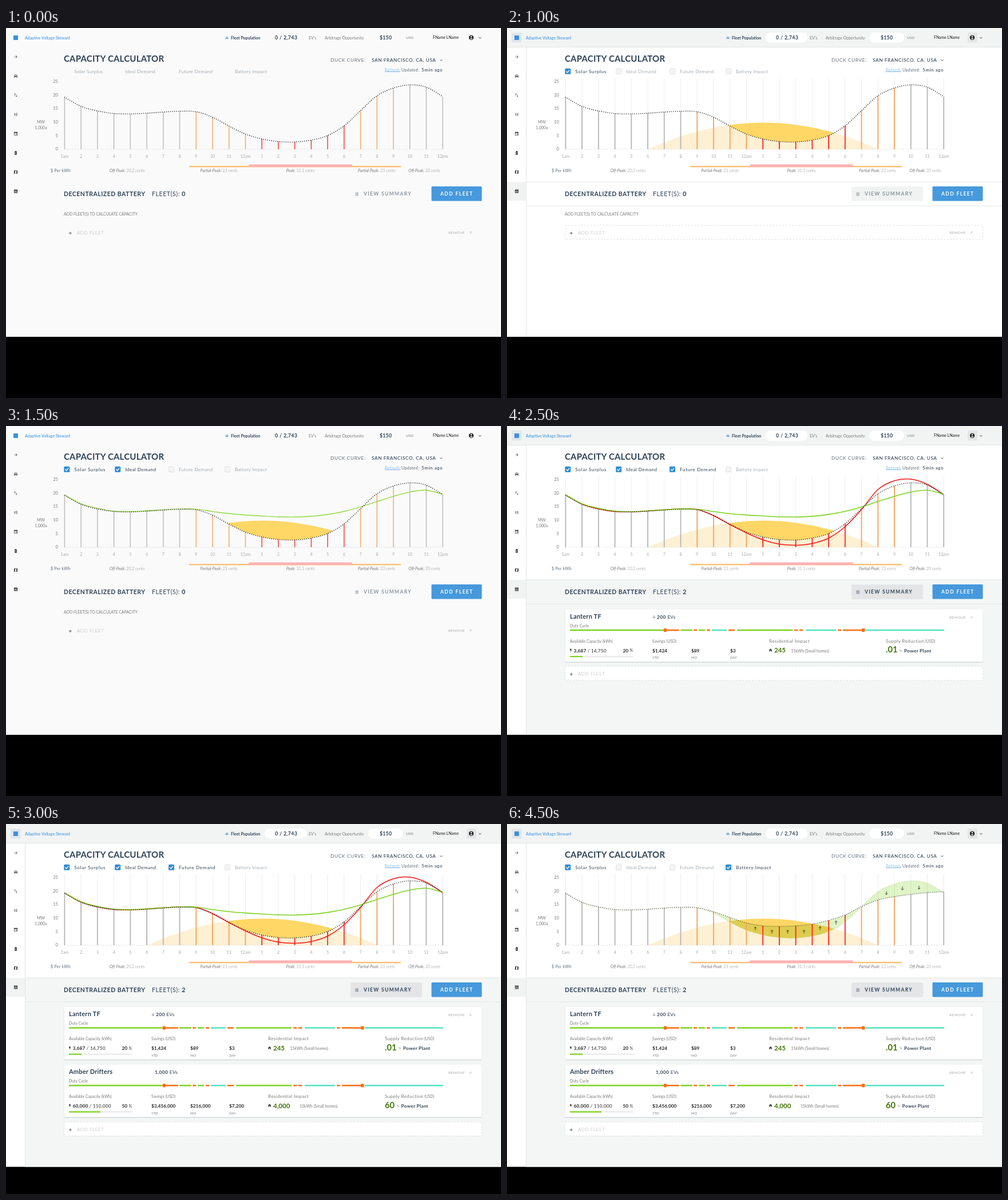
Animation of 865 by 647 pixels, one loop 5 s. Source, as an HTML page:

```html
<!DOCTYPE html>
<html lang="en">
<head>
<meta charset="utf-8">
<title>Capacity calculator</title>
<style>
html, body { margin: 0; width: 100%; height: 100%; overflow: hidden; background: #000; }
svg { display: block; width: 100vw; height: 100vh; }
text { font-family: Lato, sans-serif; fill: #2f4358; white-space: pre; }
.b { font-weight: 700; }
.m { font-weight: 500; }
.l { font-weight: 300; }
.i { font-style: italic; }
.mid { text-anchor: middle; }
.end { text-anchor: end; }
.dark { fill: #2a2a2a; }
.slate { fill: #5d6b79; }
.grey { fill: #7b7b7b; }
.pale { fill: #a9a9a9; }
.blue { fill: #2f8fe3; }
.white { fill: #fff; }
.orange { fill: #ff6d0c; }
.lime { fill: #7ed321; }
.green { fill: #417505; }
.dots { fill: none; stroke-linecap: round; }
.tint { mix-blend-mode: multiply; }
</style>
</head>
<body>
<svg id="stage" viewBox="0 0 865 647" preserveAspectRatio="none"></svg>
<script>
const LOOP = 5000, SLOT = 500;
const ORANGE = '#ff6d0c', LIME = '#7ed321', TEAL = '#50e3c2';

const text = (x, y, size, str, cls = '', gap = 0) =>
  `<text x="${x}" y="${y + size * .36}" font-size="${size}" class="${cls}" letter-spacing="${gap}">${str}</text>`;
const rect = (x, y, w, h, fill, extra = '') =>
  `<rect x="${x}" y="${y}" width="${w}" height="${h}" fill="${fill}" ${extra}/>`;
const line = (x1, y1, x2, y2, color, w = 1, extra = '') =>
  `<path d="M${x1} ${y1}L${x2} ${y2}" stroke="${color}" stroke-width="${w}" ${extra}/>`;
const dot = (x, y, r, fill) => `<circle cx="${x}" cy="${y}" r="${r}" fill="${fill}"/>`;
const stroke = (d, color, w, extra = '') =>
  `<path d="${d}" fill="none" stroke="${color}" stroke-width="${w}" ${extra}/>`;
const icon = (x, y, size, d, fill = '#444') =>
  `<path transform="translate(${x - size / 2} ${y - size / 2}) scale(${size / 24})" d="${d}" fill="${fill}" fill-rule="evenodd"/>`;
const chevron = (x, y, s = 1, color = '#444') => stroke(`M${x - 2} ${y - s}l2 ${2 * s}l2 ${-2 * s}`, color, 1);
const cross = (x, y) => stroke(`M${x - 1.7} ${y - 1.7}l3.4 3.4m0 -3.4l-3.4 3.4`, '#aaa', .7);
const plus = y => stroke(`M109.8 ${y}h5m-2.5 -2.5v5`, '#555', .9);
const at = (dy, body) => `<g transform="translate(0 ${dy})">${body}</g>`;
// Shown only during the listed half-second slots.
const show = (slots, body) => `<g data-on="${slots}">${body}</g>`;

const PLAIN = '034', FULL = '1256789', FLEETS = '156789';

const CAR = 'M19 6L17.5 4.5h-11L5 6L2.5 12v9h3.5v-3h12v3h3.5v-9zM5 11l1.5-4.5h11L19 11zM5 13.5h3v2.5h-3zM16 13.5h3v2.5h-3z';
const SIDE_ICONS = [
  'M2 11h15l-6-6l1.5-1.5L21 12l-8.5 8.5L11 19l6-6H2z',
  CAR,
  'M8 2L3.5 7H7v8h2V7h3.5zM16 22l4.5-5H17V9h-2v8h-3.5z',
  'M2 5h11v2H2zM16 3h2v2h4v2h-4v2h-2zM2 11h4V9h2v6H6v-2H2zM11 11h11v2H11zM2 17h9v2H2zM14 15h2v2h6v2h-6v2h-2z',
  'M2 3h4V1h3v2h6V1h3v2h4v19H2zM4.5 9v10.5h15V9zM12 12h5v5h-5z',
  'M9 1h6v3h3v19H6V4h3zM11 8v5H9l3 6v-5h2z',
  'M2 4l6-2l8 2l6-2v18l-6 2l-8-2l-6 2zM8.5 5v13l7 1.5v-13z',
  'M2 2h20v20H2zM6 10h2.5v8H6zM11 6h2.5v12H11zM16 13h2.5v5H16z'
];

function shell() {
  const page = h => rect(0, 0, 865, h, '#fff');
  const body = h => rect(34, 269, 831, h - 269, '#f4f6f6');
  const edge = h => line(33.5, 34, 33.5, h, '#e1e4e5');
  return show(PLAIN, rect(0, 0, 865, 540, '#fafafa')) +
    show('25', page(540)) + show('6789', page(599.5)) +
    show('1', page(466.5) + body(647)) + show('5', body(540)) + show('6789', body(599.5)) +
    show(FULL,
      rect(0, 0, 865, 33.5, '#f2f4f4') + line(0, 33.5, 865, 33.5, '#e3e6e7') +
      rect(0, 269, 33, 33, '#f1f3f3') +
      line(34, 269, 865, 269, '#e1e5e6') + line(34, 311, 865, 311, '#e1e5e6') +
      rect(8, 8, 17.5, 17.5, '#e2e6e9', 'rx="1.5"') + rect(805, 8, 17, 17.5, '#e3e5e6', 'rx="1.5"') +
      rect(452, 8, 73, 17.5, '#fff', 'rx="8.7"') + rect(633, 8, 61, 17.5, '#fff', 'rx="8.7"')) +
    show('1', edge(466.5)) + show('25', edge(540)) + show('6789', edge(599.5));
}

function header() {
  return rect(13, 13, 8, 8, '#3d91dc') +
    text(33, 17, 7, 'Adaptive Voltage Steward', 'blue') +
    icon(386, 17, 6, CAR, '#3d91dc') +
    text(393, 17, 7, 'Fleet Population', 'b') +
    text(470, 17, 8.8, '0 / 2,743', 'b', .35) +
    text(529, 17, 7, "EV's", 'grey') +
    text(557, 17, 7, 'Arbitrage Opportunity', 'grey') +
    text(653, 17, 8.8, '$150', 'b', .2) +
    text(699, 17, 6.5, 'USD', 'grey') +
    text(746, 17, 6.9, 'FName LName', 'm dark') +
    dot(813, 16.8, 4.1, '#222') + dot(813, 15.3, 1.3, '#f3f3f3') +
    `<path d="M810.5 18.8q2.5 -2 5 0q-2.5 2.3 -5 0" fill="#f3f3f3"/>` +
    chevron(828.3, 17.2, 1.1) +
    SIDE_ICONS.map((d, i) => icon(17, 50.3 + i * 33.6, 7.4, d)).join('');
}

function titles() {
  return text(101, 53.7, 15, 'CAPACITY CALCULATOR', 'b', .2) +
    text(567, 56, 8.2, 'DUCK CURVE:', 'slate', .7) +
    text(639, 56, 8.2, 'SAN FRANCISCO, CA, USA', 'm', .63) + chevron(760.5, 56.3) +
    text(662, 73, 7.2, 'Refresh', 'l blue', .4) + line(662, 76.5, 689, 76.5, '#2f8fe3', .6) +
    text(691, 73, 7.2, 'Updated:', 'slate', .25) +
    text(726, 72.7, 8, '5min ago', 'm', .6);
}

function option(x, label, onSlots, gapOff, gapOn) {
  const offSlots = [...'0123456789'].filter(s => !onSlots.includes(s)).join('');
  const boxSlots = offSlots.replace('0', '');
  return show(boxSlots, rect(x + .5, 71.2, 9.2, 9.2, '#f4f4f4', 'rx="1.5" stroke="#dcdcdc" stroke-width=".8"')) +
    show(offSlots, text(x + 18, 76.3, 8.2, label, 'l slate', gapOff)) +
    show(onSlots, rect(x, 70.8, 10, 10, '#2f8bd6', 'rx="1.5"') +
      stroke(`M${x + 2.2} 75.8l2.1 2.2l3.7 -4.3`, '#fff', 1.3) +
      text(x + 18, 76.3, 8.2, label, '', gapOn));
}

// Heights of each curve at the 24 hours of the day.
const DUCK = [121, 137, 145, 149.5, 150.2, 149, 147, 145.6, 146.5, 156, 171.5, 185.5,
  194, 198.5, 199.3, 196, 188, 171, 144.5, 118.5, 105, 99.5, 103.5, 120];
const IDEAL = [120.5, 136, 144, 148.8, 149.7, 148.2, 146.5, 145, 145.5, 149.5, 153.2, 155.6,
  157.3, 158.8, 159.2, 157.9, 154.6, 149.3, 141.5, 132, 123, 115.5, 112.3, 119.5];
const FUTURE = [120.5, 136.5, 145, 149.5, 150, 148.5, 146.5, 145, 145.8, 157, 172.5, 187,
  199, 206.5, 208.5, 205.5, 196, 176, 146, 111, 95.7, 93, 102, 120];
const STORED = DUCK.slice(0, 9).concat([153.5, 163.5, 173, 178, 179, 178, 175, 168.5, 159,
  144.5, 133, 127, 123, 120, 118.5]);

const hourX = i => 102.4 + i * 28.73;
const points = ys => ys.map((y, i) => [hourX(i), y]);
const smooth = pts => pts.slice(1).map((c, i) => {
  const b = pts[i], a = pts[i - 1] || b, d = pts[i + 2] || c;
  const out = k => (b[k] + (c[k] - a[k]) / 6).toFixed(2), into = k => (c[k] - (d[k] - b[k]) / 6).toFixed(2);
  return `C${out(0)} ${out(1)} ${into(0)} ${into(1)} ${c}`;
}).join('');
const curve = ys => `M${points(ys)[0]}${smooth(points(ys))}`;

function bars(ys, w) {
  const color = i => i < 8 || i > 20 ? '#b8b8b8' : i > 11 && i < 18 ? '#ff2a26' : '#f4a65c';
  return ys.map((y, i) => line(hourX(i), y, hourX(i), 212, color(i), w)).join('');
}

const arrow = (x, y, dir) =>
  stroke(`M${x} ${y + 3 * dir}V${y - 3 * dir}m-2.2 ${2.2 * dir}l2.2 ${-2.2 * dir}l2.2 ${2.2 * dir}`, '#333', .9);

function chart() {
  const sun = 'M247 212Q448 119 649 212Z';
  const stored = points(STORED).reverse();
  const band = `${curve(DUCK)}L${stored[0]}${smooth(stored)}Z`;
  const suffix = { 0: 'am', 11: 'am', 23: 'pm' };
  const hours = DUCK.map((_, i) => (i % 12 + 1) + (suffix[i] || ''));
  const up = [[434, 183], [463, 188.5], [490.5, 188.5], [519, 188.5], [547, 182.5], [575, 172.5]];
  const down = [[663, 120.5], [691, 112.5], [720, 111]];
  const dotted = (ys, color, w, step) => stroke(curve(ys), color, w, `class="dots" stroke-dasharray="0 ${step}"`);
  return `<defs><clipPath id="above"><path d="${curve(DUCK)}V80H102Z"/></clipPath></defs>` +
    show(FULL, DUCK.map((_, i) => line(hourX(i), 88, hourX(i), 212, '#ececec')).join('') +
      `<path d="${sun}" fill="#fef0d3"/>`) +
    show('123456789', `<path d="${sun}" fill="#fed766" clip-path="url(#above)"/>`) +
    show('19', `<path d="${band}" fill="#dff4c7" class="tint"/>`) +
    line(102, 212, 763, 212, '#d4d4d4', .9, 'stroke-dasharray="2 2.5"') +
    show(PLAIN, bars(DUCK, 1.4)) + show('25678', bars(DUCK, 1.9)) + show('19', bars(STORED, 1.9)) +
    show('4567', stroke(curve(FUTURE), '#fb1414', 1.5)) +
    show('34', stroke(curve(IDEAL), LIME, 1.2)) + show('56', stroke(curve(IDEAL), LIME, 1.6)) +
    show('02345678', dotted(DUCK, '#222', 1.6, 3.6)) +
    show('19', dotted(DUCK, '#a3c957', 1.1, 3) + dotted(STORED, '#333', 1.4, 3.5) +
      up.map(p => arrow(...p, 1)).join('') + down.map(p => arrow(...p, -1)).join('')) +
    [25, 20, 15, 10, 5, 0].map((n, i) => text(91, 93.5 + i * 23.6, 7.6, n, 'end grey')).join('') +
    text(61, 164.5, 7.2, 'MW', 'mid grey') + text(61, 174, 7, '1,000x', 'mid grey') +
    hours.map((h, i) => text(hourX(i), 224.3, 7.3, h, 'mid pale')).join('');
}

function prices() {
  const price = (x, name, cost) => text(x, 249.7, 7,
    `<tspan class="i grey">${name}:</tspan><tspan class="l grey"> ${cost} cents</tspan>`, 'mid');
  const round = 'stroke-linecap="round"';
  return line(321, 242.2, 689, 242.2, '#fdc277', 2.4, round) +
    line(426, 240.8, 603, 240.8, '#ffb1b4', 4.5, round) +
    text(78, 249.7, 7, '$ Per kWh', 'slate', .3) +
    price(211.5, 'Off-Peak', '20.2') + price(372, 'Partial-Peak', '23') + price(514.5, 'Peak', '31.1') +
    price(647.5, 'Partial-Peak', '23') + price(731, 'Off-Peak', '20');
}

function toolbar() {
  const summary = (cls, mark) => [288, 289.6, 291.2, 292.8].map(y => line(610.3, y, 616, y, mark, 1.1)).join('') +
    text(625, 290.3, 8.5, 'VIEW SUMMARY', cls, 1.35);
  const button = fill => rect(602, 277.3, 125, 25.4, fill, 'rx="1.5"');
  return text(101, 290.2, 10.5, 'DECENTRALIZED BATTERY', 'b', .5) +
    text(255, 290.2, 10.5, 'FLEET(S):', '', .6) +
    show('01234', text(307, 290.2, 11, '0', 'b')) + show('56789', text(307, 290.2, 11, '2', 'b')) +
    show(FLEETS, button('#e3e5e6') + summary('b', '#8a949e')) + show('2', button('#f1f3f3')) +
    show('0234', `<g opacity=".55">${summary('b', '#6b7580')}</g>`) +
    rect(743.5, 277, 88, 25.6, '#4699dc', 'rx="1.5"') +
    text(759, 290.3, 8.5, 'ADD FLEET', 'b white', 1.4);
}

const remove = y => text(773, y, 6.5, 'REMOVE', 'pale', .3) + cross(812, y);
const dashedRow = y => rect(101.5, y, 730, 24.5, '#fff', 'stroke="#dcdfe0" stroke-dasharray="3 2.5" stroke-width=".9"');
const addLabel = y => plus(y + .5) + text(124, y, 8, 'ADD FLEET', 'l pale', .6);
const addRow = y => dashedRow(y) + addLabel(y + 13.3);

function emptyList() {
  return show('0234', text(101, 325.3, 6.9, 'ADD FLEET(S) TO CALCULATE CAPACITY', 'grey')) +
    show('2', dashedRow(345)) + show('0234', addLabel(358.2) + remove(357.3));
}

function summary() {
  const stat = (x, label, value, cls, unitX, unit, size = 7.4) =>
    text(x, 342, 6.9, label, 'grey') + text(x, 356, 15, value, 'b ' + cls) + text(unitX, 358.6, size, unit, 'dark');
  return rect(34, 311.5, 831, 74.5, '#fff') + line(34, 386, 865, 386, '#e1e5e6') +
    text(101, 325.3, 7, 'SUMMARY', '', .25) +
    stat(101, "Today's Energy Supply", '18,000', 'dark', 149, 'MW') +
    stat(220, 'Solar Surplus Lost', '1,200', 'orange', 262, 'MW') +
    stat(356, 'Solar Surplus Stored', '500', 'lime', 385, 'MW') +
    stat(492, 'C02 Eliminated', '568,250', 'lime', 551, 'Metric tons CO2', 7.6) +
    text(356, 368, 5.4, '1,136.5 lbs CO2 per megawatt-hour generated', 'i m dark') +
    text(785, 376, 6.5, 'HIDE', 'slate', .3) + chevron(811.3, 376, -.8, '#888');
}

function dutyCycle(y) {
  const runs = [
    [LIME, 110, 273, 303, 324, 335, 346, 402, 499],
    [ORANGE, 280, 301, 326, 332, 349, 355, 387, 398, 502, 508, 511, 517.5, 578, 584, 587, 619],
    [TEAL, 358, 384, 522, 575, 627, 764]
  ];
  return runs.map(([color, ...xs]) => stroke(
    xs.map((x, i) => i % 2 ? `H${x}` : `M${x} ${y}`).join(''), color, 2.4)).join('') +
    dot(276.5, y, 3.2, ORANGE) + dot(622.5, y, 3.2, ORANGE);
}

function card(f) {
  const saving = (x, value, unit) => text(x, 72.7, 8.3, value, 'b dark') + text(x, 85, 6.3, unit, 'i grey');
  const lock = stroke('M255.8 13.5v-1.2a1.1 1.1 0 0 1 2.2 0v1.2', '#999', .6) + rect(254.8, 13.3, 4.2, 2.8, '#bbb');
  return rect(101.5, 1, 730, 92.8, '#d3d7d9', 'rx="1.5"') + rect(101.5, 0, 730, 92.3, '#fff', 'rx="1.5" stroke="#e4e7e8" stroke-width=".5"') +
    text(110, 13, 11, f.name, 'b', .2) + (f.locked ? lock : '') +
    text(f.evX, 14, 8.3, `<tspan class="b">${f.evs}</tspan> EVs`, '', .4) + remove(14.5) +
    text(110, 29.5, 6.9, 'Duty Cycle', 'grey') + dutyCycle(37) +
    text(110, 56.5, 6.9, 'Available Capacity (kWh)', 'grey') +
    text(254, 56.5, 6.9, 'Savings (USD)', 'grey') +
    text(458, 56, 8.2, 'Residential Impact', 'grey', .3) +
    text(662, 56, 8.2, 'Supply Reduction', 'grey', .3) + text(731, 56.5, 6.8, '(USD)', 'grey') +
    `<path d="M110.3 69.5h2.4l-.6 2h1l-2.2 3.5l.3 -2.5h-1z" fill="#333"/>` +
    text(116.5, 72.7, 8.3, `<tspan class="b dark">${f.used}</tspan> / ${f.total}`, 'dark', .15) +
    text(202.5, 72.7, 8.3, f.percent, 'b dark') + text(214.5, 72.9, 7, '%', 'dark') +
    rect(110, 82, 110.5, 2.2, '#e8e9e9') + rect(110, 82, f.percent * 1.1, 2.2, LIME) +
    saving(254, f.savings[0], 'YTD') + saving(322, f.savings[1], 'MO') + saving(390, f.savings[2], 'DAY') +
    `<path d="M457.6 72l3 -2.8l3 2.8h-.8v2.5h-1.5v-1.8h-1.4v1.8h-1.5v-2.5z" fill="#444"/>` +
    text(467, 72.2, 11.5, f.homes, 'b green') + text(f.noteX, 73, 7, '15kWh (Small homes)', 'grey') +
    text(662, 71.2, 14.6, f.supply, 'b green') + text(f.plantX - 8, 72.7, 5.5, '%', 'grey') +
    text(f.plantX, 72.7, 8.3, 'Power Plant', 'b', .25);
}

function fleets() {
  const small = card({
    name: 'Lantern TF', locked: true, evX: 262, evs: '200', used: '3,687', total: '14,750', percent: 20,
    savings: ['$1,424', '$89', '$3'], homes: '245', noteX: 496.5, supply: '.01', plantX: 694
  });
  const large = card({
    name: 'Amber Drifters', evX: 260, evs: '1,000', used: '60,000', total: '110,000', percent: 50,
    savings: ['$3,456,000', '$216,000', '$7,200'], homes: '4,000', noteX: 513, supply: '60', plantX: 690.5
  });
  const both = small + at(100.8, large) + addRow(201.5);
  return show('1', summary() + at(395.2, both)) +
    show('5', at(320, small + addRow(100.3))) +
    show('6789', at(319.5, both));
}

const stage = document.getElementById('stage');
stage.innerHTML = shell() + header() + titles() +
  option(101.3, 'Solar Surplus', '123456789', .35, .63) +
  option(190.2, 'Ideal Demand', '3456', .35, .38) +
  option(284, 'Future Demand', '4567', .32, .63) +
  option(382, 'Battery Impact', '19', .32, .63) +
  chart() + prices() + toolbar() + emptyList() + fleets();

const layers = [...stage.querySelectorAll('[data-on]')];
let current = -1;
function tick() {
  const slot = Math.floor(performance.now() % LOOP / SLOT);
  if (slot !== current) {
    current = slot;
    for (const layer of layers) layer.style.display = layer.dataset.on.includes(slot) ? '' : 'none';
  }
  requestAnimationFrame(tick);
}
tick();
</script>
</body>
</html>
```
